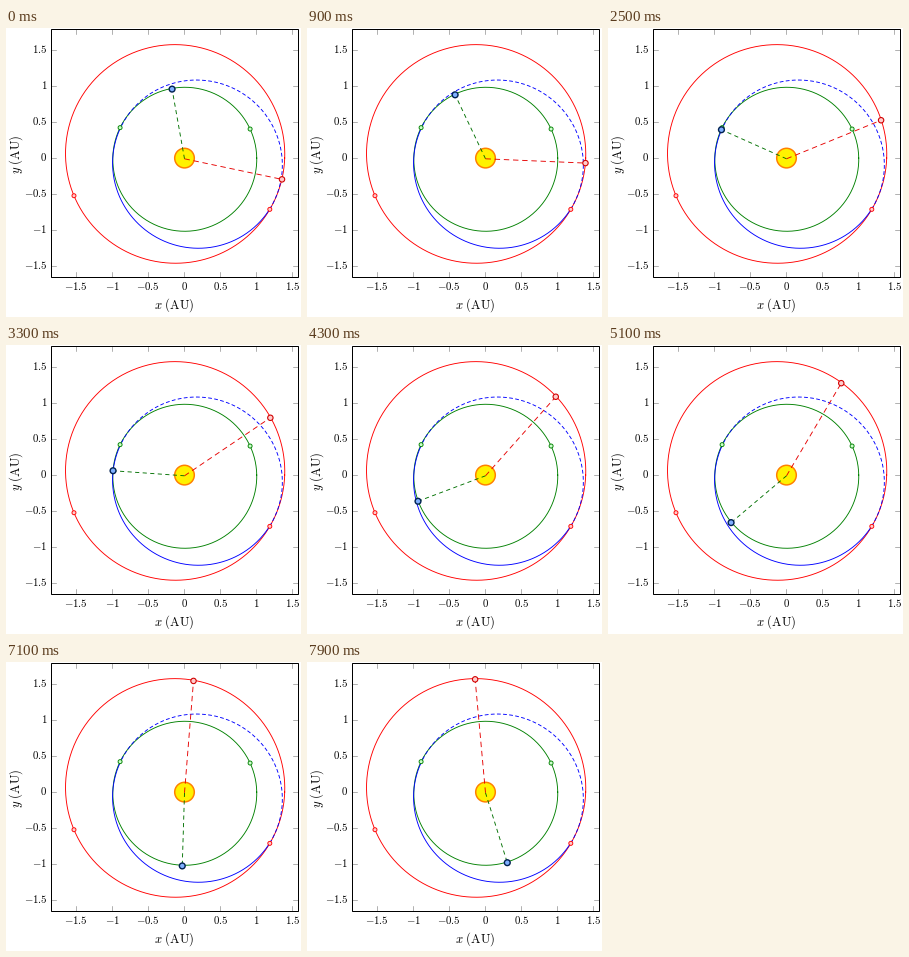
Write a matplotlib script that moves like this. It is 295 px wide and 289 px high and loops after 8000 ms.

```python
import numpy as np
import matplotlib.pyplot as plt
from matplotlib.animation import FuncAnimation
from matplotlib.patches import Circle, Rectangle

W, H, DPI = 295, 289, 64
PT = 72 / DPI                      # points per pixel
SX, SY, AU = 178.5, 130.1, 72.0    # sun position and pixels per AU
DROP = 0.7                         # the moving bodies sit slightly low
RED, GREEN, BLUE = "#ff0000", "#008000", "#0000ff"
TICKS = np.arange(-1.5, 1.6, 0.5)

# semi-major axis, eccentricity, perihelion direction in degrees
EARTH = (1.0, 0.0167, 102.9)
MARS = (1.5237, 0.0934, -24.0)
TRANSFER = (1.182, 0.168, 155.0)

plt.rcParams["mathtext.fontset"] = "cm"
fig = plt.figure(figsize=(W / DPI, H / DPI), dpi=DPI, facecolor="white")
ax = fig.add_axes([0, 0, 1, 1])
ax.set(xlim=(0, W), ylim=(H, 0))
ax.axis("off")


def point(orbit, angle):
    """Pixel position on an orbit seen from the sun at a heading in degrees."""
    a, e, peri = orbit
    t = np.radians(angle)
    r = a * (1 - e * e) / (1 + e * np.cos(t - np.radians(peri)))
    return SX + AU * r * np.cos(t), SY - AU * r * np.sin(t)


def heading(orbit, mean):
    """Heading in degrees for a mean anomaly in degrees."""
    _, e, peri = orbit
    m = np.radians(mean)
    ecc = m
    for _ in range(8):
        ecc = m + e * np.sin(ecc)
    half = np.sqrt((1 + e) / (1 - e)) * np.tan(ecc / 2)
    return peri + np.degrees(2 * np.arctan(half))


def arc(orbit, start, end, color, **style):
    x, y = point(orbit, np.linspace(start, end, 400))
    ax.plot(x, y, color=color, lw=0.9 * PT, **style)


def disc(xy, r, edge, fill, lw, z):
    return ax.add_patch(Circle(xy, r, ec=edge, fc=fill, lw=lw * PT, zorder=z))


def label(x, y, text, size, **style):
    ax.text(x, y, text, fontsize=size * PT, **style)


def draw_axes():
    left, top, right, bottom = 45, 1, 292, 249
    for v in TICKS:
        x, y = SX - 0.5 + AU * v, SY - AU * v
        for xs, ys in (((x, x), (bottom, bottom - 5)), ((x, x), (top, top + 5)),
                       ((left, left + 5), (y, y)), ((right, right - 5), (y, y))):
            ax.plot(xs, ys, color="#808080", lw=0.6 * PT, zorder=1)
        text = f"${v:g}$"
        label(x + 0.2, 261.5, text, 10.8, ha="center", va="baseline")
        label(41.2, y + 3.3, text, 10.8, ha="right", va="baseline")
    ax.add_patch(Rectangle((left, top), right - left, bottom - top,
                           fill=False, lw=PT, zorder=6))
    label(168.3, 281, r"$x\ \mathrm{(AU)}$", 12.6, ha="center", va="baseline")
    label(10.3, 126, r"$y\ \mathrm{(AU)}$", 12.6, ha="center", va="center",
          rotation=90)


draw_axes()
arc(EARTH, 0, 360, GREEN)
arc(MARS, 0, 360, RED)
arc(TRANSFER, 155, 329, BLUE)
arc(TRANSFER, 329, 515, BLUE, dashes=(4.2, 2.6))
for angle in (154.7, 23.9):
    disc(point(EARTH, angle), 2, GREEN, "#ccffcc", 0.9, 4)
for angle in (198.8, -31):
    disc(point(MARS, angle), 2, RED, "#ffcccc", 0.9, 4)
disc((SX, SY), 9.8, "#ff8000", "#fff200", 1.5, 3)

earth_ray, = ax.plot([], [], color="#007000", lw=0.9 * PT, dashes=(4.6, 3.8),
                     zorder=4)
mars_ray, = ax.plot([], [], color="#e60000", lw=0.9 * PT, dashes=(6, 4.2),
                    zorder=4)
earth = disc((0, 0), 2.9, "#002050", "#80b0ff", 1.4, 5)
mars = disc((0, 0), 2.7, "#d00000", "#ffcccc", 1.1, 5)


def update(frame):
    # one five-day step every second frame after the opening hold
    step = 0 if frame < 5 else (frame - 3) // 2
    for orbit, mean, body, ray in (
            (EARTH, -2.7 + 4.928 * step, earth, earth_ray),
            (MARS, 10 + 2.62 * step, mars, mars_ray)):
        x, y = point(orbit, heading(orbit, mean))
        body.center = x, y + DROP
        ray.set_data([SX, x], [SY + DROP, y + DROP])
    return earth, mars, earth_ray, mars_ray


anim = FuncAnimation(fig, update, frames=80, interval=100, repeat=True,
                     repeat_delay=0, blit=False)
plt.show()
```
